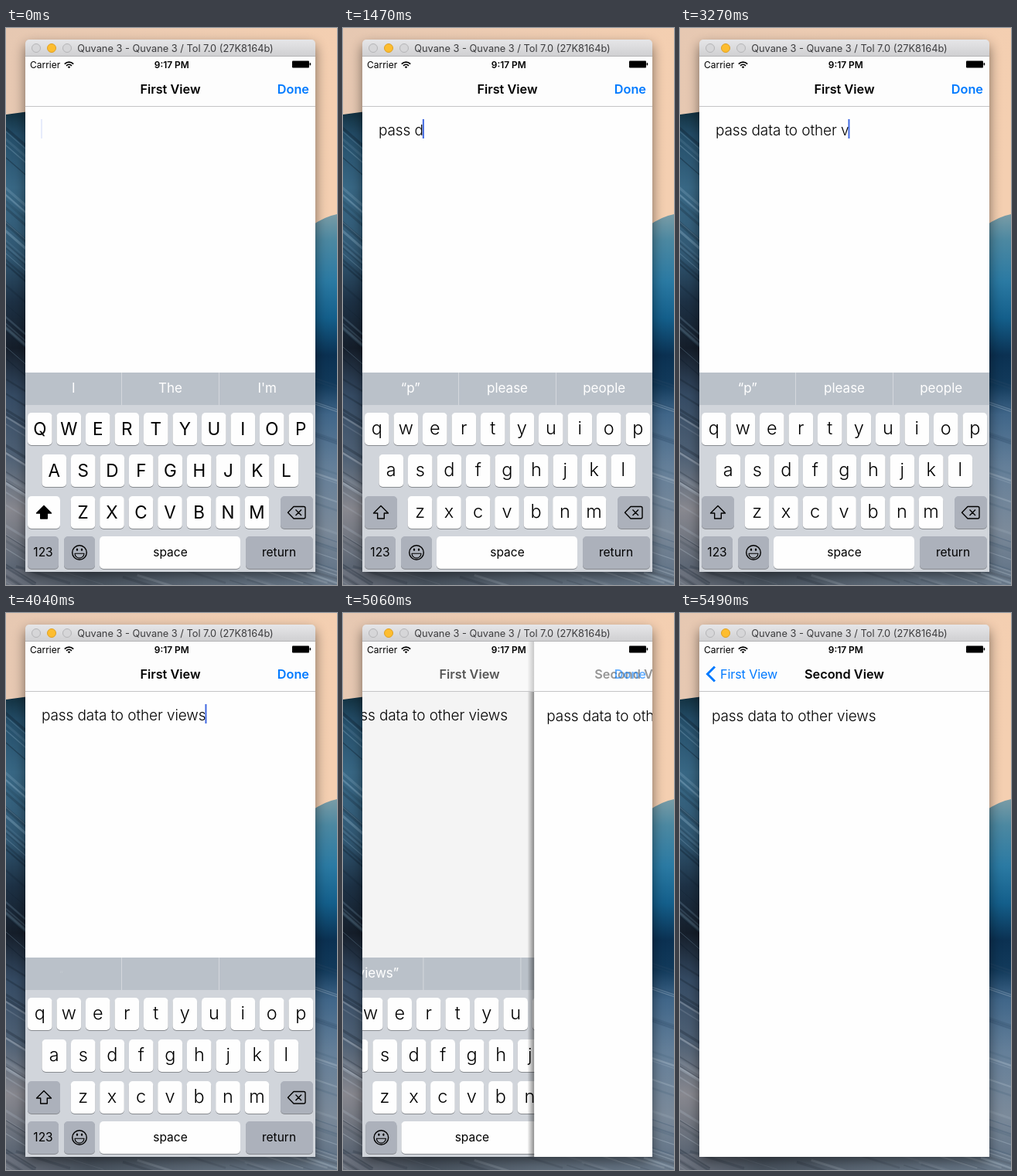
Recreate the animation shown at these times as an HTML page. Size 428 by 721 pixels, loop 6450 ms.

```html
<!DOCTYPE html>
<html lang="en">
<head>
<meta charset="utf-8">
<title>Passing text to a second view</title>
<style>
  html, body { margin: 0; width: 100%; height: 100%; overflow: hidden; background: #eccbb0; }
  svg { display: block; width: 428px; height: 721px; font-family: Inter, Roboto, sans-serif; }
  text { white-space: pre; }
  .mid { text-anchor: middle; }
  .bold { font-weight: 600; font-size: 16.3px; }
  .note { font-weight: 300; font-size: 19px; letter-spacing: -.1px; }
  .blue { fill: #007aff; }
  .upper { font-size: 22.5px; }
  .lower { font-size: 23.5px; font-weight: 350; }
  .label { font-size: 15.5px; }
  .hint { font-size: 17px; fill: #fff; }
</style>
</head>
<body>
<svg id="stage" viewBox="0 0 428 721" xmlns="http://www.w3.org/2000/svg">
  <defs>
    <linearGradient id="sky" x2="1" y2=".1">
      <stop stop-color="#e6c8b2"/><stop offset="1" stop-color="#f4cfb1"/>
    </linearGradient>
    <linearGradient id="left" gradientUnits="userSpaceOnUse" x1="0" y1="108" x2="0" y2="721">
      <stop stop-color="#12303f"/><stop offset=".05" stop-color="#244d68"/>
      <stop offset=".16" stop-color="#386784"/><stop offset=".3" stop-color="#315873"/>
      <stop offset=".4" stop-color="#1d3145"/><stop offset=".5" stop-color="#151e2a"/>
      <stop offset=".6" stop-color="#354b64"/><stop offset=".73" stop-color="#4f6175"/>
      <stop offset=".84" stop-color="#88888f"/><stop offset="1" stop-color="#4f5c6c"/>
    </linearGradient>
    <linearGradient id="right" gradientUnits="userSpaceOnUse" x1="0" y1="241" x2="0" y2="721">
      <stop stop-color="#7a9ca6"/><stop offset=".07" stop-color="#4c88a1"/>
      <stop offset=".18" stop-color="#2b7aa3"/><stop offset=".28" stop-color="#145f8b"/>
      <stop offset=".38" stop-color="#0b3152"/><stop offset=".46" stop-color="#123a5b"/>
      <stop offset=".54" stop-color="#406689"/><stop offset=".68" stop-color="#647f99"/>
      <stop offset=".85" stop-color="#7b8a9a"/><stop offset="1" stop-color="#5c6e82"/>
    </linearGradient>
    <linearGradient id="floor">
      <stop stop-color="#6c727e"/><stop offset=".25" stop-color="#49535f"/>
      <stop offset=".6" stop-color="#5f6c7a"/><stop offset="1" stop-color="#687889"/>
    </linearGradient>
    <linearGradient id="bar" x2="0" y2="1">
      <stop stop-color="#e6e6e8"/><stop offset="1" stop-color="#cfcfd1"/>
    </linearGradient>
    <linearGradient id="edge">
      <stop stop-color="#000" stop-opacity="0"/><stop offset="1" stop-color="#000" stop-opacity=".45"/>
    </linearGradient>
    <filter id="soft" x="-20%" y="-20%" width="140%" height="140%"><feGaussianBlur stdDeviation="8"/></filter>
    <clipPath id="screen"><rect x="25" y="37" width="375" height="667"/></clipPath>
    <clipPath id="waves"><path d="M0 112L30 108V700H395V256Q412 244 428 241V721H0Z"/></clipPath>
  </defs>

  <rect width="428" height="721" fill="url(#sky)"/>
  <g id="sea" clip-path="url(#waves)">
    <rect y="100" width="60" height="621" fill="url(#left)"/>
    <rect x="380" y="240" width="48" height="481" fill="url(#right)"/>
    <rect y="700" width="428" height="21" fill="url(#floor)"/>
  </g>
  <rect x="25" y="22" width="375" height="687" rx="5" filter="url(#soft)" opacity=".5"/>

  <path d="M25 37V20a5 5 0 0 1 5-5H395a5 5 0 0 1 5 5V37Z" fill="url(#bar)"/>
  <path d="M25 36.5H400" stroke="#b4b4b6"/>
  <g stroke-width="1">
    <circle cx="39" cy="26" r="5.5" fill="#d6d6d8" stroke="#b5b5b7"/>
    <circle cx="59" cy="26" r="5.5" fill="#fdbd2f" stroke="#dfa023"/>
    <circle cx="79" cy="26" r="5.5" fill="#d6d6d8" stroke="#b5b5b7"/>
  </g>
  <text class="mid" x="219" y="31" font-size="12.8" fill="#3c3c3e">Quvane 3 - Quvane 3 / Tol 7.0 (27K8164b)</text>

  <g clip-path="url(#screen)">
    <rect x="25" y="37" width="375" height="667" fill="#fefefe"/>
    <g id="first">
      <text id="typed" class="note" x="46" y="139"></text>
      <rect id="caret" y="118" width="2" height="25" fill="#4169e1"/>
      <rect id="dim" x="25" y="37" width="500" height="409"/>
      <g id="keyboard">
        <rect x="25" y="446" width="375" height="258" fill="#d1d5db"/>
        <rect x="25" y="446" width="375" height="42" fill="#bac1c9"/>
        <path d="M149.5 446V488M275.5 446V488" stroke="#d4d8dd"/>
      </g>
    </g>
    <g id="second">
      <rect id="shade" x="16" y="37" width="9" height="667" fill="url(#edge)"/>
      <rect x="25" y="37" width="375" height="667" fill="#fefefe"/>
      <text class="note" x="41" y="140">pass data to other views</text>
    </g>
    <rect x="25" y="37" width="375" height="64" fill="#fefefe" opacity=".55"/>
    <path d="M25 101.5H400" stroke="#c4c4c6"/>
    <text x="31" y="51.5" font-size="12">Carrier</text>
    <g fill="none" stroke="#000" stroke-width="1.7">
      <path d="M75.8 46.6a8 8 0 0 1 11.4 0M78 48.9a5 5 0 0 1 7 0"/>
      <path d="M81.5 52.2L79.7 50.3a2.6 2.6 0 0 1 3.6 0Z" fill="#000" stroke="none"/>
    </g>
    <text class="mid" x="214.3" y="51.5" font-size="11.9" font-weight="600">9:17 PM</text>
    <rect x="370" y="42.5" width="22" height="9" rx="1"/>
    <rect x="392.6" y="45" width="1.6" height="3.5" rx=".8"/>
    <text id="title1" class="mid bold" x="212.5" y="85">First View</text>
    <text id="title2" class="mid bold" x="212.5" y="85">Second View</text>
    <text id="done" class="bold blue" x="392" y="85" text-anchor="end">Done</text>
    <path id="chevron" d="M45 69.5L35.5 79L45 88.5" fill="none" stroke="#007aff" stroke-width="3"/>
    <text id="back" class="blue mid" x="89" y="85" font-size="16.1" letter-spacing="-.1">First View</text>
  </g>
  <path id="mouse" d="M0 0V14.5L3.4 11.4L5.6 16.6L8.2 15.5L6 10.5H10.6Z" stroke="#fff" stroke-width="1.2"/>
</svg>

<script>
const LOOP = 6450;
const NOTE = 'pass data to other views';
const TYPED_AT = [720, 900, 1050, 1170, 1320, 1470, 1620, 1740, 1890, 2100, 2250, 2340,
  2430, 2580, 2700, 2850, 2910, 3000, 3060, 3270, 3360, 3420, 3480, 3690];
const CARET = [[0, .12], [29, .12], [30, 0], [300, 0], [420, 1], [4380, 1], [4540, 0], [LOOP, 0]];
const PRESS = [[0, 1], [4610, 1], [4670, .35], [4790, 1], [LOOP, 1]];
const MOUSE_X = [[4250, 160], [4490, 196], [4580, 350], [4700, 358]];
const MOUSE_Y = [[4250, 310], [4490, 124], [4580, 88], [4700, 80]];

const $ = id => document.getElementById(id);
const clamp = v => Math.min(1, Math.max(0, v));

function el(tag, attrs, parent, text) {
  const node = document.createElementNS('http://www.w3.org/2000/svg', tag);
  for (const name in attrs) node.setAttribute(name, attrs[name]);
  if (text) node.textContent = text;
  return parent.appendChild(node);
}

function track(points, t) {
  if (t <= points[0][0]) return points[0][1];
  for (let i = 1; i < points.length; i++) {
    const [t0, a] = points[i - 1], [t1, b] = points[i];
    if (t < t1) return a + (b - a) * (t - t0) / (t1 - t0);
  }
  return points[points.length - 1][1];
}

// Wallpaper streaks
let seed = 11;
const rnd = () => (seed = (seed * 16807) % 2147483647) / 2147483647;
function streaks(count, x, w, y, h, dx, dy, colors) {
  for (let i = 0; i < count; i++) {
    const sx = x + rnd() * w, sy = y + rnd() * h;
    el('path', {
      d: `M${sx.toFixed(1)} ${sy.toFixed(1)}l${dx} ${dy}`,
      stroke: colors[i % colors.length],
      'stroke-width': (1 + rnd() * 2.5).toFixed(1),
      opacity: (.12 + rnd() * .25).toFixed(2)
    }, $('sea'));
  }
}
streaks(34, -20, 10, 110, 330, 55, 48, ['#8fb4cc', '#0d1b29']);
streaks(28, -20, 10, 440, 270, 55, 34, ['#b9c3cf', '#16222f']);
streaks(24, 385, 10, 450, 260, 50, 17, ['#c3d0dc', '#2d4a66']);
streaks(14, 10, 380, 695, 20, 70, 22, ['#a5afba', '#2e3946']);

// Keyboard
const board = $('keyboard');
const upper = el('g', { class: 'mid upper' }, board);
const lower = el('g', { class: 'mid lower' }, board);
function key(x, y, w, fill) {
  el('rect', { x, y: y + 1, width: w, height: 42, rx: 5, fill: '#888b90' }, board);
  return el('rect', { x, y, width: w, height: 42, rx: 5, fill }, board);
}
const GREY = '#acb1bb', WHITE = '#fefefe';
[['QWERTYUIOP', 28, 498], ['ASDFGHJKL', 46.5, 552], ['ZXCVBNM', 83.7, 606]].forEach(([row, x0, y]) => {
  [...row].forEach((c, i) => {
    const x = x0 + i * 37.5;
    key(x, y, 31.6, WHITE);
    el('text', { x: x + 15.8, y: y + 29 }, upper, c);
    el('text', { x: x + 15.8, y: y + 27.5 }, lower, c.toLowerCase());
  });
});
const shiftKey = key(28, 606, 42, WHITE);
key(355, 606, 42, GREY);
key(28, 658, 40, GREY);
key(75, 658, 40, GREY);
key(121, 658, 182, WHITE);
key(310, 658, 87, GREY);
board.append(upper, lower);
[['123', 48], ['space', 212.5], ['return', 353]].forEach(([s, x]) =>
  el('text', { class: 'mid label', x, y: 684 }, board, s));

const line = { fill: 'none', stroke: '#000', 'stroke-width': 1.4, 'stroke-linejoin': 'round' };
const arrow = el('path', { ...line, d: 'M49 618.5L58.5 628H53.3V635H44.7V628H39.5Z' }, board);
el('path', { ...line, d: 'M372 619.5H385a2 2 0 0 1 2 2V633a2 2 0 0 1-2 2H372L364.5 627.2ZM374.5 623.5l7.5 7.5m0-7.5l-7.5 7.5' }, board);
el('circle', { ...line, cx: 95, cy: 679, r: 9.3 }, board);
el('path', { ...line, 'stroke-width': 1.1, d: 'M89 680.3H101a6 5.8 0 0 1-12 0Z' }, board);
for (const cx of [92, 98]) el('ellipse', { cx, cy: 675.3, rx: 1.1, ry: 1.8 }, board);

// Word suggestions: letters ripple in, then the whole word fades
const SETS = [
  { words: ['I', 'The', 'I\'m'], from: -1000, to: 720 },
  { words: ['“p”', 'please', 'people'], from: 840, to: 3870 },
  { words: ['“views”'], from: 3990, to: 5600 }
];
const hints = SETS.flatMap(({ words, from, to }) => words.map((word, slot) => {
  const node = el('text', { class: 'mid hint', x: 87.3 + slot * 125.2, y: 471.5 }, board);
  const letters = [...word].map(c => el('tspan', {}, node, c));
  if (slot === 1) letters.reverse();
  return { node, letters, from: from + (slot ? 0 : 40), to };
}));

function drawHints(t) {
  for (const { node, letters, from, to } of hints) {
    const shown = t < from ? 0 : 1 - clamp((t - to) / 120);
    node.setAttribute('opacity', shown);
    if (!shown) continue;
    letters.forEach((span, k) => {
      const v = clamp((t - from - k * 25) / 90);
      span.setAttribute('fill-opacity', v);
      span.style.fontSize = 10 + 7 * Math.min(1, v * 1.3) + 'px';
    });
  }
}

// Critically damped spring used by the push
function push(t) {
  if (t < 4990) return 0;
  const s = (t - 4980) * .01725;
  return t > 5490 ? 1 : 1 - (1 + s) * Math.exp(-s);
}

const fade = (id, v) => $(id).setAttribute('opacity', v);
const move = (id, x, y = 0) => $(id).setAttribute('transform', `translate(${x} ${y})`);
const typed = $('typed');

function draw(t) {
  const count = TYPED_AT.filter(at => at <= t).length;
  const text = NOTE.slice(0, count);
  if (typed.textContent !== text) typed.textContent = text;
  $('caret').setAttribute('x', 45 + (count ? typed.getComputedTextLength() : 0));
  fade('caret', track(CARET, t));

  const caps = count === 0;
  upper.setAttribute('opacity', caps ? 1 : 0);
  lower.setAttribute('opacity', caps ? 0 : 1);
  shiftKey.setAttribute('fill', caps ? WHITE : GREY);
  arrow.setAttribute('fill', caps ? '#000' : 'none');
  drawHints(t);

  const p = push(t), rest = 1 - p;
  move('first', -112 * p);
  fade('dim', .1 * p);
  move('second', 375 * rest);
  fade('second', p > 0 ? 1 : 0);
  fade('shade', Math.min(1, rest * 8));
  move('title1', -120 * p);
  fade('title1', rest * rest + rest * .5);
  move('title2', 277 * rest);
  fade('title2', p);
  move('back', 145 * rest);
  fade('back', p ** 14);
  fade('chevron', p ** 13);
  fade('done', track(PRESS, t) * rest);

  move('mouse', track(MOUSE_X, t), track(MOUSE_Y, t));
  fade('mouse', t >= 4250 && t < 5000 ? 1 : 0);
}

const start = performance.now();
function tick() {
  draw((performance.now() - start) % LOOP);
  requestAnimationFrame(tick);
}
tick();
</script>
</body>
</html>
```
